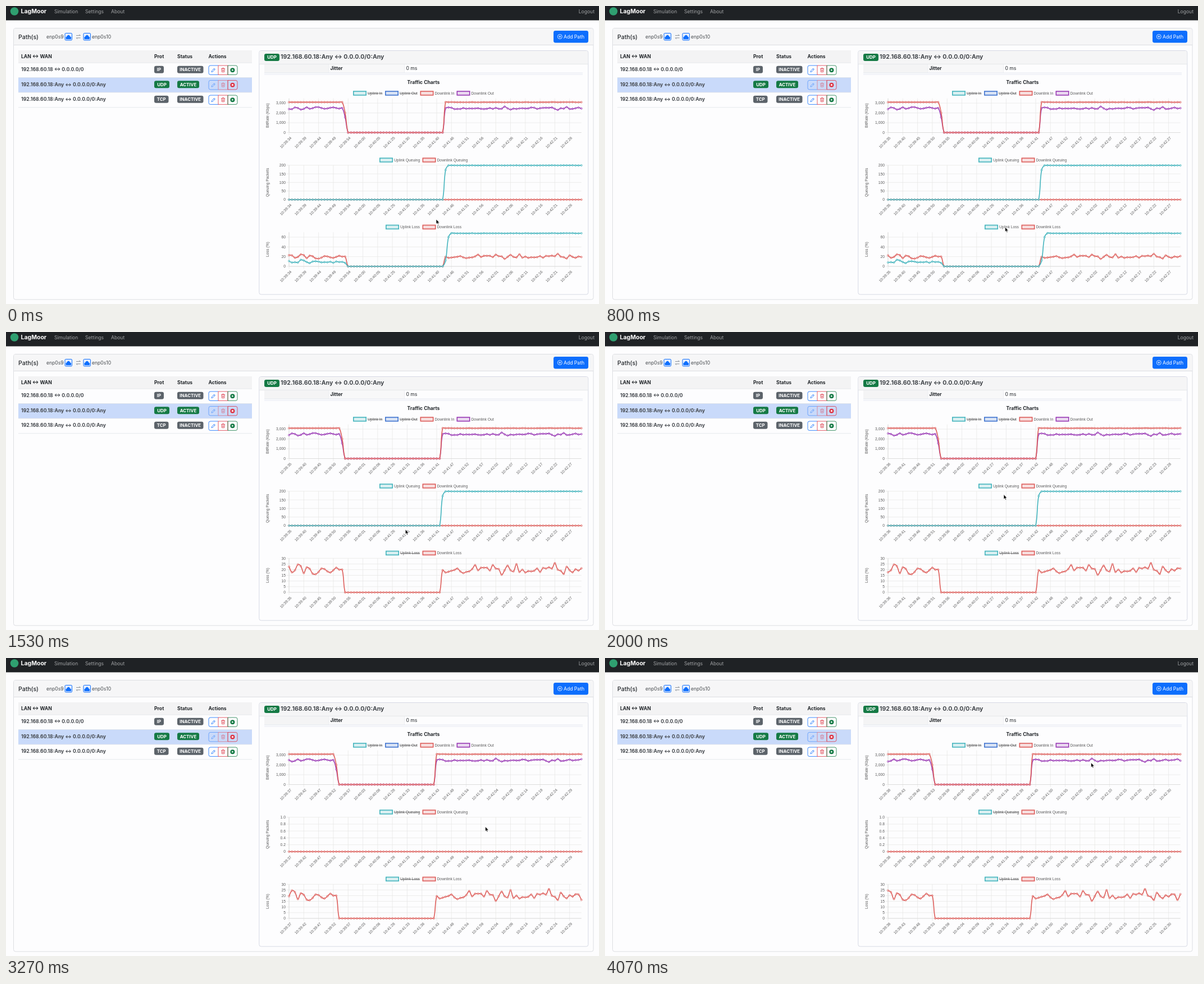
These frames come from a looping animation (1056 by 531 pixels, 4.14 s). An HTML page:

```html
<!DOCTYPE html>
<html lang="en">
<head>
<meta charset="utf-8">
<title>Traffic dashboard</title>
<style>
  html, body { margin: 0; width: 100%; height: 100%; overflow: hidden; background: #fdfdfe; }
  svg { display: block; width: 1056px; height: 531px; }
  text { font-family: Inter, "Open Sans", sans-serif; font-size: 8.6px; fill: #212529; }
  .chart text { font-family: "Liberation Sans", sans-serif; font-size: 6.75px; fill: #5c5c5c; }
  .bold { font-weight: 700; }
  .big { font-size: 10.5px; }
  .badge { font-size: 7.9px; font-weight: 700; fill: #fff; }
  .nav { fill: #a2a4a6; }
  .end { text-anchor: end; }
  .mid { text-anchor: middle; }
</style>
</head>
<body>
<svg viewBox="0 0 1056 531">
  <g id="page"></g>
  <g id="charts" class="chart"></g>
  <path id="cursor" d="M0 0V8.4L1.9 6.7 3.2 9.6 4.6 9 3.4 6.2H6Z" fill="#000" stroke="#fff" stroke-width=".7"/>
</svg>
<script>
const LOOP = 4140, COUNT = 100, LEFT = 504, RIGHT = 1024.7;
const STEP = (RIGHT - LEFT) / (COUNT - 1);
const BLUE = '#0d6efd', RED = '#dc3545', GREEN = '#157a45', GRAY = '#5c636a';
const TEAL_LINE = '#43b4bd', BLUE_LINE = '#3f73cf', RED_LINE = '#dd5d5a', PURPLE_LINE = '#9838b4';

const text = (x, y, s, cls = '', more = '') => `<text x="${x}" y="${y}" class="${cls}" ${more}>${s}</text>`;
const rect = (x, y, w, h, fill, more = '') =>
  `<rect x="${x}" y="${y}" width="${w}" height="${h}" fill="${fill}" ${more}/>`;
const path = (d, stroke, width = 1, more = '') =>
  `<path d="${d}" fill="none" stroke="${stroke}" stroke-width="${width}" ${more}/>`;
const badge = (x, y, w, s, fill) =>
  rect(x, y, w, 13, fill, 'rx="3.2"') + text(x + w / 2, y + 9.4, s, 'badge mid');

// ---- static page ----
function portIcon(x) {
  return rect(x + .5, 48.5, 12.5, 12.5, '#e8f0ff', `rx="1.6" stroke="${BLUE}"`) +
    `<path d="M${x + 2} 59.3v-4.3h1.6v-1.7h1.6v-1.6h3.1v1.6h1.6v1.7h1.6v4.3z" fill="${BLUE}"/>`;
}

function actions(y, running) {
  const faded = running ? 'opacity=".6"' : '';
  const last = running ? RED : GREEN;
  const sign = running ? 'M402 -1.4h2.8v2.8h-2.8z' : 'M402.3 -1.9l3 1.9-3 1.9z';
  return `<g transform="translate(0 ${y})">
    <g ${faded}>${path('M378 -8.2h-14a3 3 0 0 0 -3 3v10.4a3 3 0 0 0 3 3h14', BLUE, .8)}
    ${path('M366 3.4l.6-2.2 4.2-4.2 1.6 1.6-4.2 4.2zM369.8 -2l1.6 1.6', BLUE, .8)}
    ${path('M378 -8.2h17v16.4h-17z', RED, .8)}
    ${path('M383.2 -2.6h6.8M385.4 -2.8v-.8h2.4v.8M384 -2.4l.4 5.8h4.4l.4-5.8M385.8 -.8v2.8M387.4 -.8v2.8', RED, .8)}</g>
    ${path('M395 -8.2h14a3 3 0 0 1 3 3v10.4a3 3 0 0 1 -3 3h-14z', last, .8)}
    <circle cx="403.4" r="4" fill="${last}"/><path d="${sign}" fill="#fff"/></g>`;
}

function row(y, name, proto, protoWidth, active) {
  const fill = active ? GREEN : GRAY;
  return text(27, y + 3, name, 'bold', 'style="fill:#42464b"') +
    badge(264, y - 6.3, protoWidth, proto, fill) +
    badge(305, y - 6.3, active ? 39 : 46.5, active ? 'ACTIVE' : 'INACTIVE', fill) +
    actions(y + 1.2, active);
}

function drawPage() {
  const line = '#dcdee2', flow = '192.168.60.18:Any ↔ 0.0.0.0/0:Any';
  document.getElementById('page').innerHTML = [
    rect(0, 0, 1056, 531, '#fdfdfe'),
    rect(0, 0, 1056, 25.5, '#1f2225'),
    '<circle cx="15" cy="9.5" r="7.3" fill="#2f9f70"/>',
    text(26.5, 13, 'LagMoor', 'bold big', 'style="fill:#fff"'),
    text(86, 12.6, 'Simulation', 'nav'), text(141, 12.6, 'Settings', 'nav'),
    text(187, 12.6, 'About', 'nav'), text(1048, 12.6, 'Logout', 'nav end'),

    rect(13.5, 39.5, 1032.5, 483.5, '#fdfdfe', `rx="3.5" stroke="${line}"`),
    rect(14, 40, 1031.5, 29.5, '#f6f6f7', 'rx="3"'),
    path('M14 69.5H1046', line),
    text(22, 58.5, 'Path(s)', 'big', 'font-weight="500"'),
    text(72, 57.6, 'enp0s9', '', 'style="fill:#484c50"'), portIcon(104.5),
    path('M125 52.6h7.4l-2-2M132.6 56.8h-7.4l2 2', '#6c757d', .8),
    portIcon(137.5), text(153, 57.6, 'enp0s10', '', 'style="fill:#484c50"'),
    rect(975, 44, 62, 21.5, BLUE, 'rx="3.4"'),
    '<circle cx="986.3" cy="54.6" r="4" fill="none" stroke="#fff" stroke-width=".8"/>',
    path('M984.2 54.6h4.2M986.3 52.5v4.2', '#fff', .8),
    text(993, 57.8, 'Add Path', '', 'style="fill:#fff"'),

    rect(22, 79, 416, 22, '#f3f3f4'),
    text(27, 93.2, 'LAN ↔ WAN', 'bold'), text(264, 93.2, 'Prot', 'bold'),
    text(305, 93.2, 'Status', 'bold'), text(360.5, 93.2, 'Actions', 'bold'),
    rect(22, 127.5, 416, 26.5, '#c9dafa'),
    path('M22 101.3H438M22 127.5H438M22 154H438M22 180.7H438', '#dfe1e5', .7),
    row(113, '192.168.60.18 ↔ 0.0.0.0/0', 'IP', 17, false),
    row(139.5, flow, 'UDP', 27, true),
    row(166, flow, 'TCP', 25.5, false),

    rect(450.8, 79.5, 586, 434.5, '#fdfdfe', 'rx="3.5" stroke="#d6d9e4"'),
    rect(451.3, 80, 585, 23.5, '#f5f5f6', 'rx="3"'),
    path('M451 103.6H1036', '#dfe1e5', .8),
    badge(460, 85, 27, 'UDP', GREEN),
    text(489, 94.4, flow, 'bold big', 'style="fill:#42464b"'),
    rect(460, 104, 114, 15, '#f4f4f5'), rect(575, 104, 134, 15, '#f8f8f9'),
    path('M460 119.3H1027M460 122H1027', '#dfe2ee', .8),
    path('M574.5 104V119M709.5 104V119', '#e7e9ee', .7),
    text(577.5, 114, 'Jitter', 'bold'), text(712.5, 114, '0 ms'),
    text(743.5, 139.3, 'Traffic Charts', 'bold mid')
  ].join('');
}

// ---- data ----
const noise = i => { const v = Math.sin(i * 12.9898) * 43758.5453; return v - Math.floor(v) - .5; };
const lossStart = [23, 22.6, 17.7, 19.5, 24.5, 23, 17, 22, 20.7, 16.5, 16, 18, 21, 20.5, 18.5, 17.5, 19.5, 21.7, 20, 20];
const lossEnd = [19.5, 17.5, 18.2, 19, 19.7, 21, 18.5, 17, 18, 18.5, 20.5, 24, 19.5, 21.7, 21.7, 21.7, 19.3, 24,
  21, 20.5, 15.5, 19.5, 23.5, 19.5, 18.5, 24.8, 18, 20, 17.5, 18.7, 18.5, 19, 21, 18, 21.5, 21, 22, 21, 25.7,
  20, 19, 16.3, 22.5, 19.5, 17.7, 20.3, 19.2, 21.2, 21, 16.3, 21.3];
const upLossStart = [11, 8, 8.7, 8, 13.5, 12, 9, 6.8, 10, 10.5, 9.8, 8.3, 8.8, 8.5, 9.5, 7.5, 10, 9, 9.2, 7];
const outStart = [2400, 2390, 2560, 2500, 2350, 2420, 2570, 2430, 2490, 2590, 2590, 2500, 2430, 2460, 2530, 2570, 2500, 2450, 2500, 1550];
const outPeaks = { 53: 2480, 54: 2560, 72: 2430, 73: 2650, 75: 2350, 91: 2310, 94: 2600, 102: 2590, 103: 2430 };

// Traffic stops after sample 19 and resumes at sample 53.
const outage = (i, before, after) => i < 20 ? before(i) : i < 53 ? 0 : after(i - 53, i);
const downIn = i => outage(i, n => n === 19 ? 2000 : 3100, () => 3100 + 24 * noise(i));
const downOut = i => outage(i, n => outStart[n], () => outPeaks[i] || 2480 + 170 * noise(i + 7));
const upQueue = i => i < 53 ? 0 : i === 53 ? 172 : 199.5 + noise(i);
const downLoss = i => outage(i, n => lossStart[n], n => lossEnd[n]);
const upLoss = i => outage(i, n => upLossStart[n], n => n === 0 ? 12 : n === 1 ? 60 : 68 + .6 * noise(i));

function clock(i) {
  const s = i + (i < 24 ? 34 : i < 35 ? 35 : i < 54 ? 110 : 111);
  const pad = n => String(n).padStart(2, '0');
  const m = 39 + Math.floor(s / 60);
  return `${10 + Math.floor(m / 60)}:${pad(m % 60)}:${pad(s % 60)}`;
}

// ---- charts ----
function series(values, shift, yOf, top, bottom, color) {
  const pts = Array.from({ length: COUNT }, (_, k) => [LEFT + k * STEP, yOf(values(k + shift))]);
  const clamp = y => Math.min(bottom, Math.max(top, y));
  const handles = pts.map((p, k) => {
    const a = pts[k - 1] || p, b = pts[k + 1] || p;
    const da = Math.hypot(p[0] - a[0], p[1] - a[1]), db = Math.hypot(b[0] - p[0], b[1] - p[1]);
    const fa = .4 * da / (da + db), fb = .4 * db / (da + db);
    const dx = b[0] - a[0], dy = b[1] - a[1];
    return [p[0] - fa * dx, clamp(p[1] - fa * dy), p[0] + fb * dx, clamp(p[1] + fb * dy)];
  });
  const f = n => n.toFixed(2);
  let curve = `M${pts[0].map(f)}`, dots = '';
  pts.forEach((p, k) => {
    if (k) curve += `C${[...handles[k - 1].slice(2), ...handles[k].slice(0, 2), ...p].map(f)}`;
    dots += `M${f(p[0] - 1.5)} ${f(p[1])}a1.5 1.5 0 1 0 3 0a1.5 1.5 0 1 0 -3 0z`;
  });
  return path(curve, color, 1.6, 'stroke-linejoin="round"') +
    `<path d="${dots}" fill="#fff" fill-opacity=".35" stroke="${color}" stroke-width=".8"/>`;
}

function legend(x, y, label, color, hidden) {
  return rect(x + .8, y - 3.4, 22.4, 6.8, color, `fill-opacity=".2" stroke="${color}" stroke-width="1.6"`) +
    text(x + 26, y + 2.4, label, '', hidden ? 'text-decoration="line-through"' : '');
}

function chart({ top, bottom, max, ticks, title, legends, lines }, shift) {
  const yOf = v => bottom - v / max * (bottom - top);
  const grid = '#e6e6e4';
  let out = text(0, 0, title, 'mid', `transform="translate(468.3 ${(top + bottom) / 2}) rotate(-90)"`);
  for (const [value, label] of ticks) {
    const y = yOf(value);
    out += path(`M499.5 ${y}H${RIGHT}`, grid, .7) + text(498, y + 2.4, label, 'end');
  }
  for (let k = 0; k < COUNT; k += 5) {
    const x = LEFT + k * STEP;
    out += path(`M${x} ${top}V${bottom + 4.5}`, grid, .7) +
      text(0, 0, clock(k + shift), 'end', `transform="translate(${x + 5} ${bottom + 10}) rotate(-45)"`);
  }
  out += path(`M${LEFT} ${top}V${bottom}H${RIGHT}`, '#d6d6d6', .7);
  for (const [x, label, color, hidden] of legends) out += legend(x, top - 9.3, label, color, hidden);
  for (const [values, color] of lines) out += series(values, shift, yOf, top, bottom, color);
  return out;
}

const scale = (max, step, show = String) =>
  Array.from({ length: Math.floor(max / step + 1.01) }, (_, k) => [k * step, show(k * step)]);

function drawCharts(shift, noQueue, noLoss) {
  const rate = {
    top: 164.7, bottom: 225.5, max: 3480, ticks: scale(3000, 1000, v => v.toLocaleString('en-US')),
    title: 'BitRate (Kbps)',
    legends: [[618, 'Uplink In', TEAL_LINE, true], [675, 'Uplink Out', BLUE_LINE, true],
      [737.5, 'Downlink In', RED_LINE], [802.5, 'Downlink Out', PURPLE_LINE]],
    lines: [[downOut, PURPLE_LINE], [downIn, RED_LINE]]
  };
  const queue = {
    top: 283.8, bottom: 345, max: noQueue ? 1 : 200,
    ticks: noQueue ? scale(1, .2, v => v ? v.toFixed(1) : '0') : scale(200, 50),
    title: 'Queuing Packets',
    legends: [[665, 'Uplink Queuing', TEAL_LINE, noQueue], [741.5, 'Downlink Queuing', RED_LINE]],
    lines: [[() => 0, RED_LINE], ...(noQueue ? [] : [[upQueue, TEAL_LINE]])]
  };
  const loss = {
    top: 403.2, bottom: 464, max: noLoss ? 30 : 70, ticks: noLoss ? scale(30, 5) : scale(60, 20),
    title: 'Loss (%)',
    legends: [[676, 'Uplink Loss', TEAL_LINE, noLoss], [741.5, 'Downlink Loss', RED_LINE]],
    lines: [[downLoss, RED_LINE], ...(noLoss ? [] : [[upLoss, TEAL_LINE]])]
  };
  document.getElementById('charts').innerHTML = [rate, queue, loss].map(c => chart(c, shift)).join('');
}

// ---- motion: time, x, y ----
const moves = [[0, 766, 380], [100, 766, 380], [470, 728, 401], [700, 712.5, 394], [1270, 712, 393.5],
  [1870, 710, 290], [2050, 710, 289.5], [2500, 707, 275], [2850, 707, 274.5], [3270, 853.5, 300.5],
  [3400, 855, 299], [3950, 865.5, 186.5], [LOOP, 865.5, 186.5]];

function cursorAt(t) {
  const n = moves.findIndex(m => m[0] > t);
  const [t0, x0, y0] = moves[n - 1], [t1, x1, y1] = moves[n];
  const u = (t - t0) / (t1 - t0), e = u * u * (3 - 2 * u);
  return [x0 + (x1 - x0) * e, y0 + (y1 - y0) * e];
}

const cursor = document.getElementById('cursor');
const start = performance.now();
let shown = '';

function frame() {
  const t = (performance.now() - start) % LOOP;
  const state = [Math.floor((t + 400) / 1000), t >= 2870, t >= 870];
  if (state.join() !== shown) {
    shown = state.join();
    drawCharts(...state);
  }
  cursor.setAttribute('transform', `translate(${cursorAt(t)})`);
  requestAnimationFrame(frame);
}

drawPage();
frame();
</script>
</body>
</html>
```
